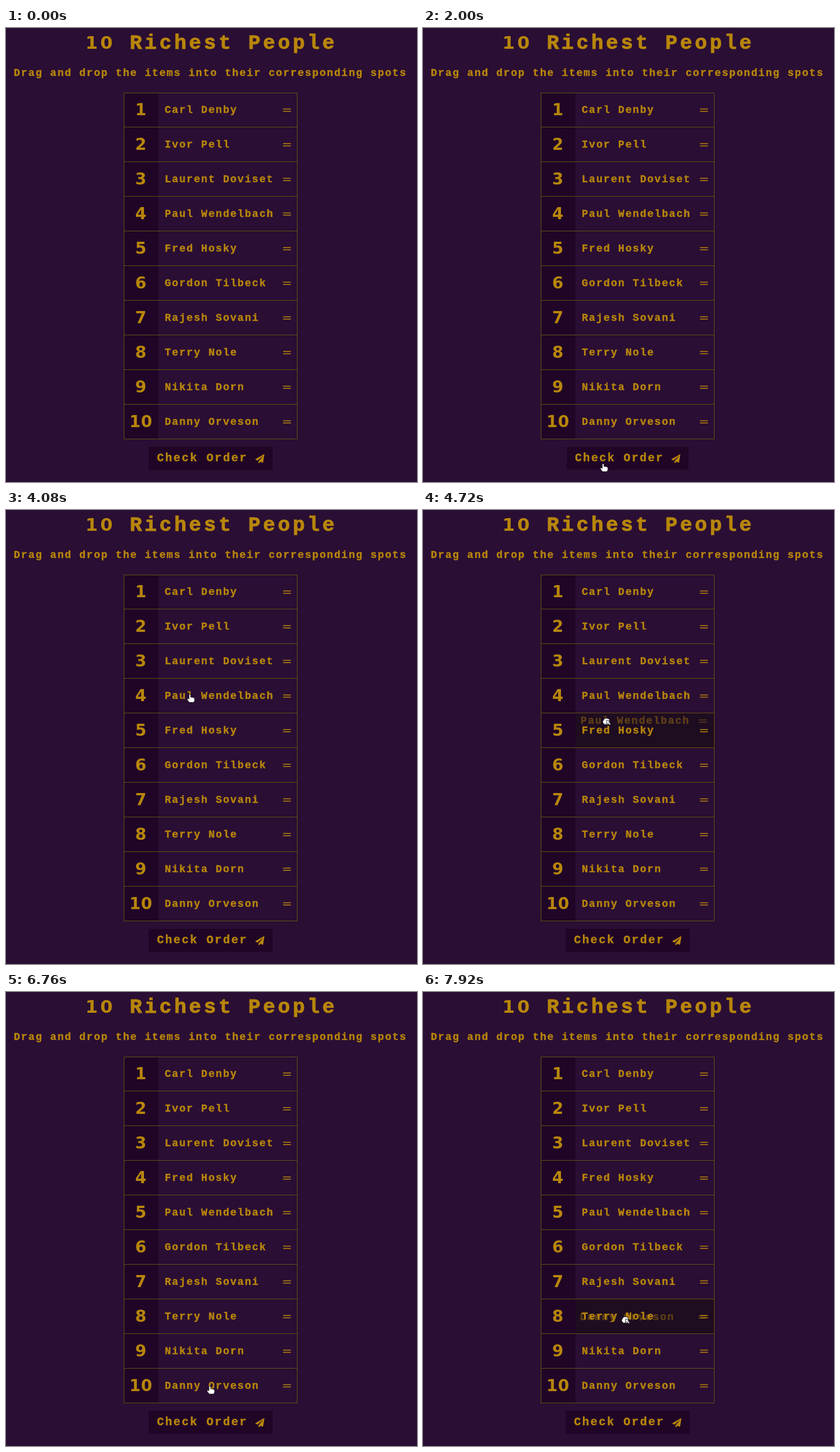
These frames come from a looping animation (712x786 px, 8 s). An HTML page:

```html
<!DOCTYPE html>
<html lang="en">
<head>
<meta charset="utf-8">
<title>10 Richest People</title>
<style>
  html, body { margin: 0; width: 100%; height: 100%; overflow: hidden; background: #2a0e34; }
  svg { display: block; width: 100%; height: 100%; }
  text {
    font: bold 18px "Liberation Mono", monospace;
    letter-spacing: 1.81px;
    fill: var(--ink, #b8860b);
    stroke: var(--ink, #b8860b);
    stroke-width: .4px;
    white-space: pre;
  }
  .title { font-size: 35px; letter-spacing: 4.65px; stroke-width: 1px; }
  .title tspan { font: bold 31px "DejaVu Sans", sans-serif; letter-spacing: 4.08px; stroke-width: 0; }
  .rank { font: bold 28px "DejaVu Sans", sans-serif; letter-spacing: .5px; text-anchor: middle; stroke-width: 0; }
  .check { font-size: 20px; letter-spacing: 2.3px; }
  .gold { fill: #b8860b; }
  .dark { fill: #200527; }
  .line { fill: none; stroke: #66500f; stroke-width: 1; }
  .over { fill: #1e0c20; visibility: hidden; }
  #button { transform-box: fill-box; transform-origin: center; }
  #ghost { opacity: .42; }
  #cursor path { fill: #fff; stroke: #111; stroke-width: .8; stroke-linejoin: round; }
</style>
</head>
<body>
<svg viewBox="0 0 712 786">
  <text class="title" x="137.5" y="36"><tspan>10</tspan> Richest People</text>
  <text x="13.5" y="83.3">Drag and drop the items into their corresponding spots</text>
  <g id="list"></g>
  <g id="button">
    <rect class="dark" x="247" y="725" width="215" height="40"/>
    <text class="check" x="261.5" y="750">Check Order</text>
    <path class="gold" transform="translate(432 738) scale(.0305)" d="M476 3.2L12.5 270.6c-18.1 10.4-15.8 35.6 2.2 43.2L121 358.4l287.3-253.2c5.5-4.9 13.3 2.6 8.6 8.3L176 407v80.5c0 23.6 28.5 32.9 42.5 15.8L282 426l124.6 52.2c14.2 6 30.4-2.9 33-18.2l72-432C515 7.8 493.3-6.8 476 3.2z"/>
  </g>
  <g id="ghost"></g>
  <g id="cursor">
    <path id="arrow" d="M0 0V13.5L3 10.8L5.2 16L7.6 15L5.4 10H9.6Z"/>
    <path id="hand" d="M-1.4 .8Q0 -.5 1.4 .8V5L4 5.2L6.3 5.8L8.3 7V10.5L7 14H-1L-4.4 9.6V7.6L-3 7.2L-1.4 8.6Z"/>
    <g id="fist">
      <path d="M-4.8 6L-3 4.6V2.8L-1 1.8L1 1.2L3.4 1.8L5.8 2.6L7 4V8L5.4 12H-2L-4.8 8.6Z"/>
      <path d="M1.6 5.4H7L5.4 7.2L8.8 11.4L7.2 13.2L4 9.4L1.6 11.2Z"/>
    </g>
  </g>
</svg>
<script>
const LOOP = 8000, STEP = 40, TOP = 112, PITCH = 59.95;
const names = ["Carl Denby", "Ivor Pell", "Laurent Doviset", "Paul Wendelbach", "Fred Hosky",
  "Gordon Tilbeck", "Rajesh Sovani", "Terry Nole", "Nikita Dorn", "Danny Orveson"];
const wrong = [3, 4, 6, 9];
const $ = id => document.getElementById(id);
const rowY = i => TOP + i * PITCH;
const grip = y => `<path class="gold" d="M480 ${y + 27.6}h13.5v1.5h-13.5zM480 ${y + 31.5}h13.5v1.5h-13.5z"/>`;
const label = (name, y) => `<text class="name" x="275" y="${y + 35}">${name}</text>` + grip(y);

$("list").innerHTML = `<rect class="dark" x="204.5" y="${TOP}" width="59.5" height="${PITCH * 10}"/>` +
  names.map((name, i) => {
    const y = rowY(i);
    return `<rect class="over" x="264" y="${y}" width="240.5" height="${PITCH}"/>
      <text class="rank" x="233.8" y="${y + 39.3}">${i + 1}</text>` + label(name, y);
  }).join("") +
  names.map((_, i) => `<path class="line" d="M204.5 ${Math.floor(rowY(i)) + .5}h300"/>`).join("") +
  `<rect class="line" x="204.5" y="112.5" width="300" height="599"/>`;

const labels = [...document.querySelectorAll("#list .name")];
const overs = [...document.querySelectorAll(".over")];

const linear = p => p;
const out = p => 1 - (1 - p) ** 2;
const smooth = p => p * p * (3 - 2 * p);

// Each key: time, x, y, easing into it.
const path = [
  [520, 49, 386], [1040, 236, 657, out],
  [1320, 236, 657], [1560, 312, 754, smooth],
  [3040, 312, 754], [3080, 311, 751], [3880, 318, 331, smooth],
  [3920, 318, 331], [4080, 318.5, 319, out],
  [4360, 318.5, 319], [4960, 315, 381, smooth],
  [5680, 315, 381], [5720, 313, 398], [6000, 307, 500, linear], [6480, 352, 680, out],
  [6680, 352, 680], [6760, 353, 682],
  [7040, 353, 682], [7400, 352, 609, linear], [7840, 350, 563, out], [7920, 349, 561]
];
const drags = [
  { row: 3, from: 4400, to: 5280, keys: [[4360, 0, 0], [4960, -3, 67, smooth]] },
  { row: 9, from: 7080, to: 8000, keys: [[7040, 0, 0], [7400, -1.5, -66.5, linear], [7840, -3, -117, out], [7920, -3, -119]] }
];
// Highlighted rows: row, from, to.
const hover = [[3, 4400, 4720], [4, 4680, 4960], [9, 7080, 7440], [8, 7400, 7680], [7, 7640, 8000]];

function at(keys, t) {
  const n = keys.findIndex(k => k[0] > t);
  if (n < 0) return keys[keys.length - 1].slice(1, 3);
  if (n === 0) return keys[0].slice(1, 3);
  const a = keys[n - 1], b = keys[n];
  const p = (b[3] || linear)((t - a[0]) / (b[0] - a[0]));
  return [a[1] + (b[1] - a[1]) * p, a[2] + (b[2] - a[2]) * p];
}

const within = (t, from, to) => t >= from && t < to;
const show = (el, on) => { el.style.visibility = on ? "visible" : "hidden"; };
const move = (el, [x, y]) => el.setAttribute("transform", `translate(${x} ${y})`);

function draw(t) {
  const checked = within(t, 2080, 3120);
  labels.forEach((el, i) => {
    const swapped = t >= 5280 && (i === 3 || i === 4);
    el.textContent = names[swapped ? 7 - i : i];
    el.style.setProperty("--ink", !checked ? "#b8860b" : wrong.includes(i) ? "#d63638" : "#2f9e2f");
  });
  overs.forEach((el, i) => show(el, hover.some(([row, from, to]) => row === i && within(t, from, to))));
  $("button").style.transform = within(t, 2000, 2080) ? "scale(.98)" : "none";

  const drag = drags.find(d => within(t, d.from, d.to));
  $("ghost").innerHTML = drag ? label(names[drag.row], rowY(drag.row)) : "";
  if (drag) move($("ghost"), at(drag.keys, t));

  const [x, y] = at(path, t);
  const seen = t >= 520;
  const fist = within(t, 4400, 5720) || t >= 7080;
  const onItem = x > 264 && x < 505 && y > 112 && y < 712;
  const onButton = x > 247 && x < 462 && y > 725 && y < 765;
  const hand = !fist && (onItem || onButton);
  move($("cursor"), [x, y]);
  show($("fist"), seen && fist);
  show($("hand"), seen && hand);
  show($("arrow"), seen && !fist && !hand);
}

const start = performance.now();
let last = -1;
function tick() {
  const t = Math.floor((performance.now() - start) % LOOP / STEP) * STEP;
  if (t !== last) draw(last = t);
  requestAnimationFrame(tick);
}
tick();
</script>
</body>
</html>
```
